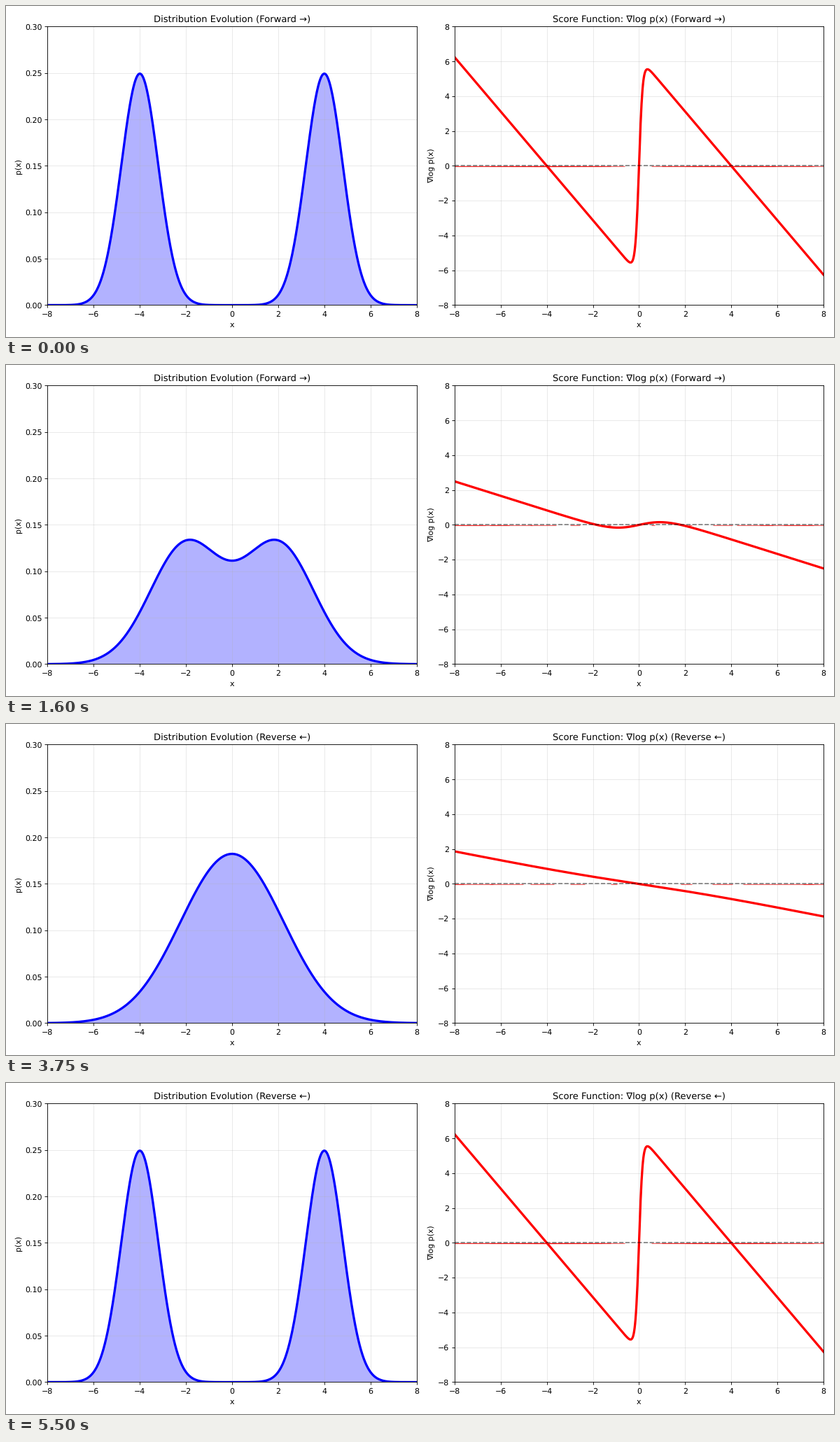
Animation, 1183 px wide and 473 px high, one loop 6 s. Source, as a matplotlib script:

```python
import numpy as np
import matplotlib.pyplot as plt
from matplotlib.animation import FuncAnimation

plt.rcParams["text.hinting"] = "none"

WIDTH, HEIGHT, DPI = 1183, 473, 78.875
FRAMES, INTERVAL = 120, 50
HALF = FRAMES // 2
START, SPAN = 9.55, 45  # frames held before the spread, and its length
ARROW_Y = -0.04

x = np.linspace(-10, 10, 1000)
tails = -10 + 1.757 * np.arange(12)


def mixture(progress):
    """Mean offset and standard deviation of the two modes."""
    return 4 * (1 - progress), 0.8 + 1.5 * progress


def density(x, mu, sigma):
    bells = sum(np.exp(-((x - m) / sigma) ** 2 / 2) for m in (-mu, mu))
    return bells / (2 * sigma * np.sqrt(2 * np.pi))


def score(x, mu, sigma):
    var = sigma ** 2
    return (mu * np.tanh(mu * x / var) - x) / var


def make_axes(left, ylabel, ylim):
    """Add one panel whose left edge is given in pixels."""
    ax = fig.add_axes([left / WIDTH, 1 - 427.5 / HEIGHT,
                       527.2 / WIDTH, 398 / HEIGHT])
    ax.set(xlim=(-8, 8), ylim=ylim, xlabel="x", ylabel=ylabel)
    ax.grid(True, alpha=0.3)
    return ax, ax.set_title("")


fig = plt.figure(figsize=((WIDTH + 0.001) / DPI, (HEIGHT + 0.001) / DPI),
                 dpi=DPI)
ax_p, title_p = make_axes(59.4, "p(x)", (0, 0.3))
ax_s, title_s = make_axes(640.8, "∇log p(x)", (-8, 8))

area, = ax_p.fill(x, 0 * x, color="blue", alpha=0.3, lw=0, zorder=1)
curve_p, = ax_p.plot([], [], color="blue", lw=3)
curve_s, = ax_s.plot([], [], color="red", lw=3)
arrows = ax_s.hlines(0 * tails + ARROW_Y, tails, tails,
                     color="red", alpha=0.6, lw=1, zorder=1.9)
ax_s.axhline(0, color="black", ls="--", alpha=0.5)


def update(frame):
    forward = frame < HALF
    step = frame if forward else FRAMES - 1 - frame
    mu, sigma = mixture(np.clip((step - START) / SPAN, 0, 1))

    p = density(x, mu, sigma)
    curve_p.set_data(x, p)
    area.set_xy(np.column_stack([np.r_[x, x[-1], x[0]], np.r_[p, 0, 0]]))
    curve_s.set_data(x, score(x, mu, sigma))

    tips = tails + score(tails, mu, sigma)
    arrows.set_segments([[(a, ARROW_Y), (b, ARROW_Y)]
                         for a, b in zip(tails, tips)])

    phase = "Forward →" if forward else "Reverse ←"
    title_p.set_text(f"Distribution Evolution ({phase})")
    title_s.set_text(f"Score Function: ∇log p(x) ({phase})")
    return area, curve_p, curve_s, arrows, title_p, title_s


anim = FuncAnimation(fig, update, frames=FRAMES, interval=INTERVAL,
                     repeat=True, repeat_delay=0, blit=False)
plt.show()
```
